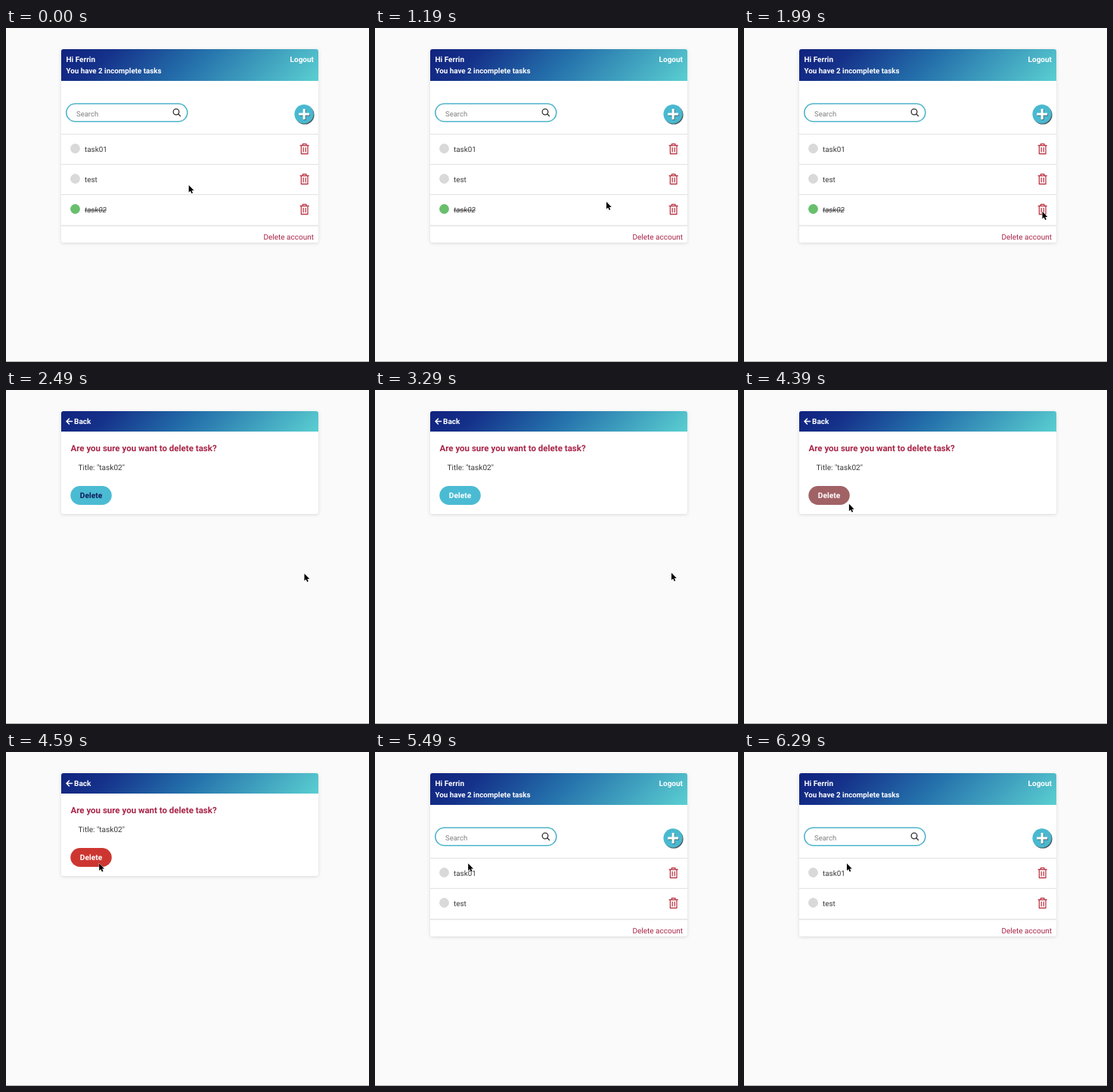
An HTML page that plays this animation: 480 by 442 pixels, repeating every 8000 ms.

```html
<!DOCTYPE html>
<html lang="en">
<head>
<meta charset="utf-8">
<title>Task list</title>
<style>
html, body { margin: 0; width: 100%; height: 100%; overflow: hidden; background: #fafafa; }
svg { display: block; width: 480px; height: 442px; font: 10px Roboto, "Open Sans", sans-serif; fill: #3a3a3a; text-rendering: geometricPrecision; }
.head { fill: #fff; font-weight: 600; }
.wine { fill: #a82548; }
.end { text-anchor: end; }
.card { fill: #fff; filter: drop-shadow(0 1px 2px #0002); }
.rule { stroke: #e2e2e2; }
.line { fill: none; stroke-linecap: round; stroke-linejoin: round; }
</style>
</head>
<body>
<svg viewBox="0 0 480 442">
  <defs>
    <linearGradient id="tall" gradientUnits="userSpaceOnUse" x1="147.5" y1="-46.5" x2="338.5" y2="144.5">
      <stop stop-color="#10237f"/><stop offset=".18" stop-color="#15318a"/>
      <stop offset=".5" stop-color="#2470ab"/><stop offset="1" stop-color="#5acfd1"/>
    </linearGradient>
    <linearGradient id="low" href="#tall" x1="151.3" y1="-50.2" x2="334.8" y2="133.2"/>
    <g id="bin" class="line" stroke="#bd3a49" stroke-width="1.3">
      <path d="M-5.5-4.5H5.5M-2.3-4.7V-6.7H2.3V-4.7M-4.3-4.3V6.5H4.3V-4.3M-1.5-1.5V3.8M1.5-1.5V3.8"/>
    </g>
  </defs>
  <rect width="480" height="442" fill="#fafafa"/>
  <path d="M0 441.5H480" stroke="#aaa"/>

  <g id="list">
    <rect id="panel" class="card" x="73" y="28" width="340" height="256" rx="3"/>
    <path d="M73 70V31a3 3 0 0 1 3-3H410a3 3 0 0 1 3 3V70Z" fill="url(#tall)"/>
    <g class="head">
      <text x="79.5" y="45.3">Hi Ferrin</text>
      <text x="79.5" y="60" font-size="9.8">You have 2 incomplete tasks</text>
      <text class="end" x="407" y="45.3">Logout</text>
    </g>
    <rect x="79.8" y="100.3" width="160" height="23.4" rx="11.7" fill="#fff" stroke="#4fb4cb" stroke-width="1.6"/>
    <text x="93" y="117" font-size="9.5" fill="#808080">Search</text>
    <g class="line" stroke="#333" stroke-width="1.3"><circle cx="225" cy="111" r="3.8"/><path d="M227.8 113.8L230.5 116.5"/></g>
    <circle cx="395" cy="115" r="12.6" fill="#4a5960"/>
    <circle cx="394" cy="113.8" r="12.6" fill="#49b9d0"/>
    <path d="M395 108V122M388 115H402" stroke="#4a6670" stroke-width="3"/>
    <path d="M394.2 107V121M387.2 114H401.2" stroke="#fff" stroke-width="3"/>
    <g id="rows"></g>
    <g id="foot">
      <path class="rule" d="M73 261.5H413" stroke-width="1.6"/>
      <text class="wine end" x="407" y="279.8">Delete account</text>
    </g>
  </g>

  <g id="confirm">
    <rect class="card" x="73" y="28" width="340" height="136" rx="3"/>
    <path d="M73 55V31a3 3 0 0 1 3-3H410a3 3 0 0 1 3 3V55Z" fill="url(#low)"/>
    <path class="line" d="M87.5 41.5H80M83.5 38L80 41.5L83.5 45" stroke="#fff" stroke-width="1.5"/>
    <text class="head" x="90" y="45.3">Back</text>
    <text class="wine" x="85.5" y="80.5" font-size="11.5" font-weight="700">Are you sure you want to delete task?</text>
    <text x="95.5" y="105.8" font-size="10.1">Title: "task02"</text>
    <rect id="button" x="85.3" y="127" width="54.5" height="25" rx="12.5"/>
    <text id="label" x="112.5" y="143" font-size="10.2" font-weight="700" text-anchor="middle">Delete</text>
  </g>

  <path id="cursor" d="M0 0V9.5L2.2 7.5 3.7 11 5.3 10.3 3.8 7H6.8Z" fill="#000" stroke="#fff" stroke-width=".8" paint-order="stroke"/>
</svg>
<script>
const el = id => document.getElementById(id);
const clamp = v => Math.max(0, Math.min(1, v));
const show = (id, on) => el(id).setAttribute('display', on ? 'inline' : 'none');
const move = (id, x, y) => el(id).setAttribute('transform', `translate(${x} ${y})`);
const mix = (a, b, p) => `rgb(${a.map((v, i) => v + (b[i] - v) * p)})`;

el('rows').innerHTML = ['task01', 'test', 'task02'].map((name, i) => {
  const y = 160 + i * 40, done = i === 2;
  const style = done ? 'font-style="italic" text-decoration="line-through"' : '';
  return `<g id="row${i}"><path class="rule" d="M73 ${y - 19.5}H413"/>
    <circle cx="91.5" cy="${y - .5}" r="6.4" fill="${done ? '#68bf6d' : '#d9d9d9'}"/>
    <text x="104" y="${y + 3.8}" font-size="9.9" ${style}>${name}</text>
    <use href="#bin" x="394.7" y="${y}"/></g>`;
}).join('');

// Cursor moves: start, step length, steps, end x, end y
const moves = [
  [90, 100, 4, 301, 223],
  [1190, 100, 1, 306, 230],
  [1290, 100, 8, 394.5, 243],
  [3090, 100, 3, 392, 242],
  [3820, 85, 3, 183.7, 160],
  [4090, 100, 6, 123.2, 147.5],
  [6290, 100, 1, 136, 147.5]
];

function cursorAt(t) {
  let x = 241.7, y = 208;
  for (const [start, step, count, ex, ey] of moves) {
    if (t < start) break;
    const p = clamp((Math.floor((t - start) / step) + 1) / count);
    const e = p * p * (3 - 2 * p);
    x += (ex - x) * e;
    y += (ey - y) * e;
  }
  return [x, y];
}

function draw(now) {
  const t = now % 8000;
  const asking = t >= 2490 && t < 5490, deleted = t >= 5490;
  show('list', !asking);
  show('confirm', asking);
  show('row2', !deleted);
  move('foot', 0, deleted ? -40 : 0);
  el('panel').setAttribute('height', deleted ? 216 : 256);

  const fade = (start, count) => clamp((Math.floor((t - start) / 100) + 1) / count);
  el('button').setAttribute('fill', mix([74, 187, 211], [205, 54, 48], fade(4290, 3)));
  el('label').setAttribute('fill', mix([14, 28, 90], [255, 255, 255], fade(3090, 3)));
  move('cursor', ...cursorAt(t));
}

const begin = performance.now();
function tick() {
  draw(performance.now() - begin);
  requestAnimationFrame(tick);
}
tick();
</script>
</body>
</html>
```
